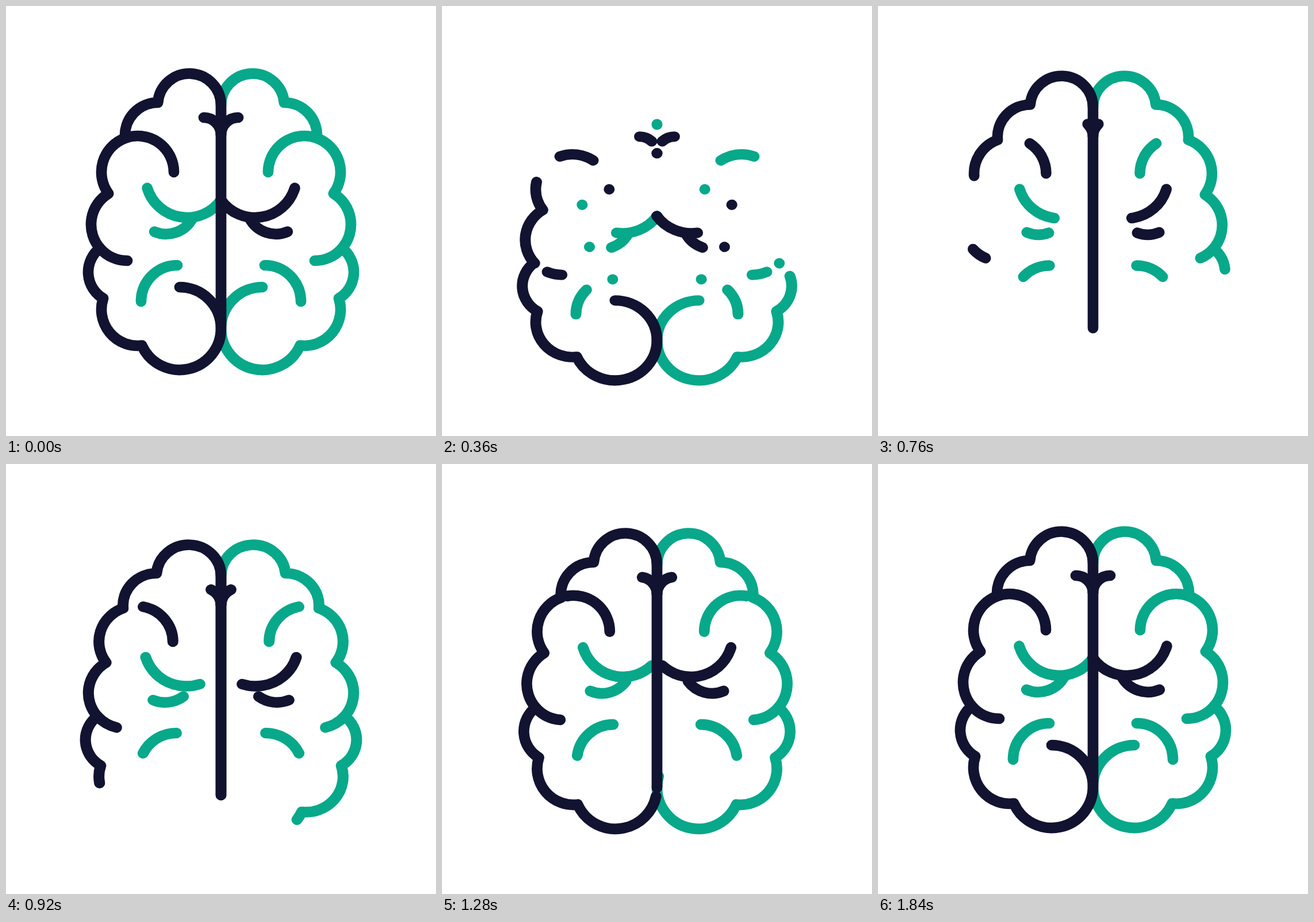
Animation of 748 by 748 pixels, one loop 2000 ms. Source, as an HTML page:

```html
<!DOCTYPE html>
<html lang="en">
<head>
<meta charset="utf-8">
<title>Brain</title>
<style>
  html, body { margin: 0; width: 100%; height: 100%; overflow: hidden; background: #fff; }
  svg { display: block; width: 100vw; height: 100vh; }
  path { fill: none; stroke-width: 18.7; stroke-linecap: round; stroke-linejoin: round; }
</style>
</head>
<body>
<svg viewBox="0 0 748 748"><g id="brain"></g></svg>
<script>
const NAVY = '#121331', GREEN = '#08a88a';
const LOOP = 2000, STEP = 40, SETTLED = 1840, MID = 374;
const brain = document.getElementById('brain');

// Every curve lies on a circle of the left half; the right half is mirrored.
const circle = (x, y, r) => ({ x, y, r });
const crown = circle(319, 172.5, 55), brow = circle(264, 225, 57);
const temple = circle(229, 289, 63), cheek = circle(211, 380, 63);
const ear = circle(196, 463, 53), jaw = circle(229, 528, 63);
const base = circle(302, 561, 72);
const outline = [crown, brow, temple, cheek, ear, jaw, base];

function at(c, deg) {
  const a = deg * Math.PI / 180;
  return [c.x + c.r * Math.cos(a), c.y + c.r * Math.sin(a)];
}
const arcTo = (c, point) => `A${c.r} ${c.r} 0 0 0 ${point}`;
const curve = (c, from, to) => `M${at(c, from)}` + arcTo(c, at(c, to));

// Outer crossing point of two neighbouring circles.
function joint(a, b) {
  const dx = b.x - a.x, dy = b.y - a.y, d = Math.hypot(dx, dy);
  const along = (d * d + a.r * a.r - b.r * b.r) / (2 * d);
  const out = Math.sqrt(a.r * a.r - along * along);
  return [a.x + (along * dx - out * dy) / d, a.y + (along * dy + out * dx) / d];
}

const lobes = outline.map((c, i) =>
  arcTo(c, c === base ? at(c, 0) : joint(c, outline[i + 1]))).join('') + arcTo(base, at(base, -90));
const rim = `M${at(crown, 0)}` + lobes;
const stem = `M${at(base, 0)}L${at(crown, 0)}` + lobes;
const curl = curve(temple, 0, -110);
const tail = curve(cheek, 138, 90);
const fork = curve(circle(344, 224, 30), 0, -90);
const bowl = curve(circle(315, 295.5, 72.5), 163, 35);
const twig = curve(circle(278.5, 344.7, 52), 113, 29);
const fold = curve(circle(298, 514, 63), -90, -180);

const lines = [];
function add(color, mirrored, ...shapes) {
  for (const d of shapes) {
    const path = document.createElementNS('http://www.w3.org/2000/svg', 'path');
    path.setAttribute('d', d);
    path.setAttribute('pathLength', 1);
    path.setAttribute('stroke', color);
    if (mirrored) path.setAttribute('transform', `translate(${2 * MID} 0) scale(-1 1)`);
    brain.append(path);
    lines.push(path);
  }
}
add(GREEN, true, rim, curl, tail, fold);
add(GREEN, false, bowl, twig, fold);
add(NAVY, true, bowl, twig, fork);
add(NAVY, false, stem, curl, tail, fork);

const clamp = x => Math.min(1, Math.max(0, x));
const smooth = u => u * u * (3 - 2 * u);

// Same as cubic-bezier(1/3, 0, 0, 1).
function glide(u) {
  let lo = 0, hi = 1;
  for (let n = 0; n < 30; n++) {
    const p = (lo + hi) / 2;
    if (p * (1 - p) ** 2 + p ** 3 < u) lo = p; else hi = p;
  }
  return smooth(lo);
}

// Crouch, leap, land and settle, eased from one to the next.
const rest = { dy: 0, sx: 1, sy: 1 };
const hop = [
  { t: 0, ...rest },
  { t: 240, dy: 52.5, sx: 1.044, sy: .95 },
  { t: 560, dy: -28, sx: .95, sy: 1.001 },
  { t: 900, dy: 18.5, sx: 1.021, sy: .982 },
  { t: 1390, ...rest },
  { t: LOOP, ...rest }
];
function pose(t) {
  const i = hop.findIndex(k => k.t > t);
  const a = hop[i - 1], b = hop[i];
  const u = smooth((t - a.t) / (b.t - a.t));
  return ['dy', 'sx', 'sy'].map(k => a[k] + (b[k] - a[k]) * u);
}

// The old line remains from `gone` to its end; the new one reaches `grown`.
function dashes(t) {
  if (t >= SETTLED) return ['none', 0];
  const gone = smooth(clamp(t / 715));
  const grown = glide(clamp((t - LOOP / 6) / (LOOP * 5 / 6)));
  if (gone >= 1) return [`${grown} 2`, 0];
  return t > LOOP / 6 ? [`${grown} ${gone - grown} 2 2`, 0] : ['2 2', -gone];
}

function draw(t) {
  const [dy, sx, sy] = pose(t);
  brain.setAttribute('transform',
    `translate(${MID} ${375 + dy}) scale(${sx} ${sy}) translate(${-MID} -375)`);
  const [array, offset] = dashes(t);
  for (const path of lines) {
    path.setAttribute('stroke-dasharray', array);
    path.setAttribute('stroke-dashoffset', offset);
  }
}

const start = performance.now();
function tick() {
  const t = (performance.now() - start) % LOOP;
  draw(Math.floor(t / STEP) * STEP);
  requestAnimationFrame(tick);
}
draw(0);
requestAnimationFrame(tick);
</script>
</body>
</html>
```
